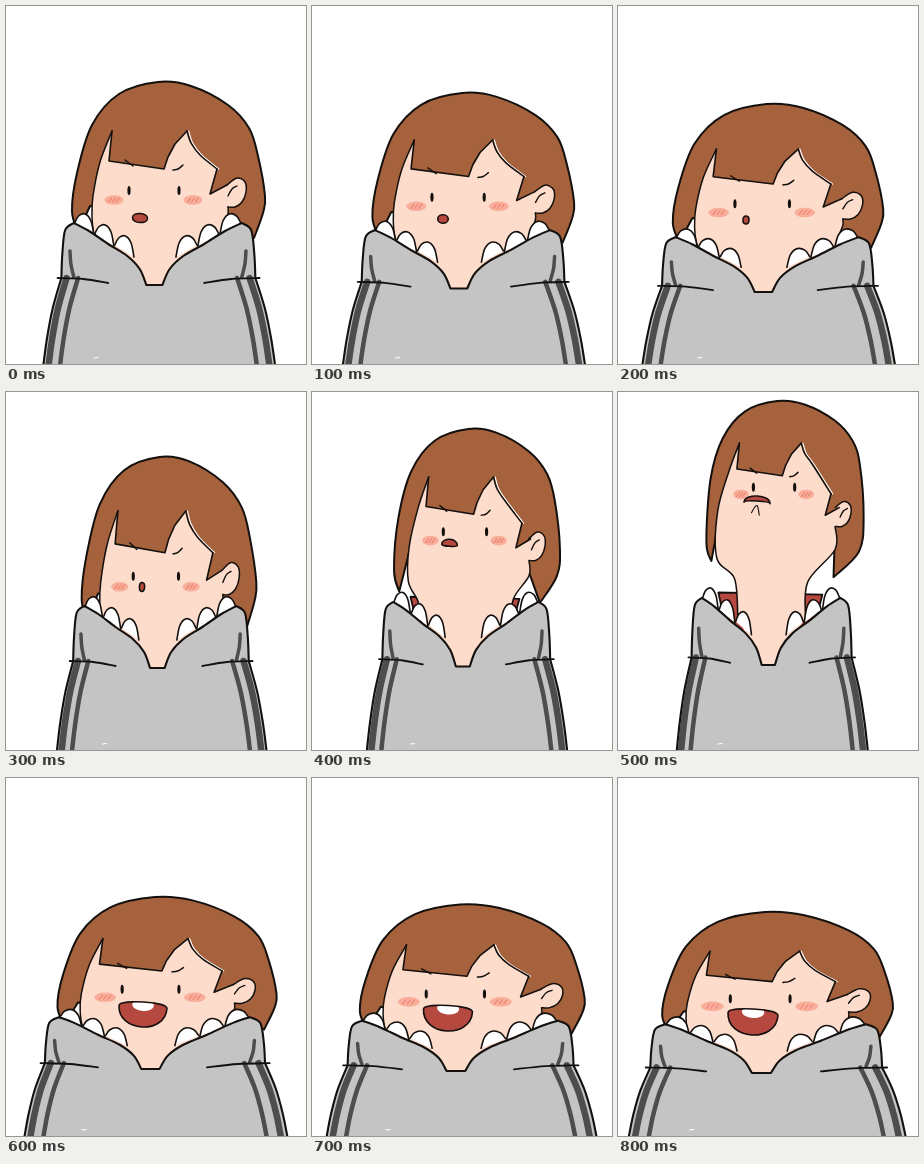
Animation of 300x358 px, one loop 900 ms. Source, as an HTML page with a canvas:

```html
<!DOCTYPE html>
<html lang="en">
<head>
<meta charset="utf-8">
<title>Stretching hoodie girl</title>
<style>
html, body { margin: 0; width: 100%; height: 100%; overflow: hidden; background: #fff; }
canvas { display: block; width: 300px; height: 358px; }
</style>
</head>
<body>
<canvas id="stage"></canvas>
<script>
const W = 300, H = 358, STEP = 100, STEPS = 9;
const INK = '#14100e', HAIR = '#a5623c', SKIN = '#fddccb', CLOTH = '#c4c4c4';
const STRIPE = '#4d4d4d', RED = '#b5483f', BLUSH = '#f8ae9a', HATCH = '#e8705c';

const canvas = document.getElementById('stage');
const ratio = window.devicePixelRatio || 1;
canvas.width = W * ratio;
canvas.height = H * ratio;
const ctx = canvas.getContext('2d');
ctx.scale(ratio, ratio);
ctx.lineCap = ctx.lineJoin = 'round';

// wide: width of everything; high: height of the head; reach: length of neck and hanging hair;
// upper and lower: bulge of the two lips.
const keys = [
  { at: 0, wide: 1,     headX: 162.5, top: 76,  high: 1,    bodyX: 148, hoodTop: 218, hoodV: 279, reach: 0, mouthX: 134, mouthY: 212, mouthW: 7.5, upper: -4.5, lower: 4.5 },
  { at: 2, wide: 1.09,  headX: 160,   top: 98,  high: .92,  bodyX: 145, hoodTop: 232, hoodV: 286, reach: 0, mouthX: 128, mouthY: 214, mouthW: 3,   upper: -4,   lower: 4 },
  { at: 3, wide: .905,  headX: 163,   top: 65,  high: 1.1,  bodyX: 151, hoodTop: 215, hoodV: 276, reach: 0, mouthX: 136, mouthY: 195, mouthW: 2.6, upper: -4.5, lower: 4.5 },
  { at: 5, wide: .825,  headX: 168,   top: 9,   high: .86,  bodyX: 150, hoodTop: 207, hoodV: 273, reach: 1, mouthX: 139, mouthY: 111, mouthW: 13,  upper: -7,   lower: -2 },
  { at: 6, wide: 1.135, headX: 161,   top: 119, high: .85,  bodyX: 144, hoodTop: 240, hoodV: 291, reach: 0, mouthX: 137, mouthY: 229, mouthW: 24,  upper: -5,   lower: 20 },
  { at: 8, wide: 1.195, headX: 159.5, top: 134, high: .8,   bodyX: 143, hoodTop: 247, hoodV: 295, reach: 0, mouthX: 135, mouthY: 236, mouthW: 25,  upper: -5,   lower: 21 }
];

function poseAt(step) {
  const i = keys.findLastIndex(k => k.at <= step);
  const a = keys[i], b = keys[i + 1] || a;
  const t = a === b ? 0 : (step - a.at) / (b.at - a.at);
  return Object.fromEntries(Object.keys(a).map(k => [k, a[k] + (b[k] - a[k]) * t]));
}

// Head points are scaled from the crown; shift is added as the neck reaches up.
function headMapper(p) {
  return (list, shift = [0, 0]) => list.map((v, i) =>
    (i % 2 ? p.top + (v - 76) * p.high : p.headX + (v - 162.5) * p.wide)
    + p.reach * shift[i % shift.length]);
}

// Body points are distances from the middle, mirrored by side, a little longer on the right.
function bodyMapper(p) {
  const mapY = y => y < 279
    ? p.hoodTop + (y - 218) / 61 * (p.hoodV - p.hoodTop)
    : p.hoodV + (y - 279) / 79 * (H - p.hoodV);
  return (side, list, inset = 0) => list.map((v, i) =>
    i % 2 ? mapY(v) : p.bodyX + (v - inset) * p.wide * (side + .045));
}

function lines(path, list) {
  for (let i = 0; i < list.length; i += 2) path.lineTo(list[i], list[i + 1]);
  return path;
}

// Smooth curve through all points of a list.
function curve(path, list) {
  const last = list.length / 2 - 1;
  const at = (i, axis) => list[2 * Math.max(0, Math.min(last, i)) + axis];
  path.lineTo(list[0], list[1]);
  for (let i = 0; i < last; i++) {
    const out = [0, 1].map(k => at(i, k) + (at(i + 1, k) - at(i - 1, k)) / 6);
    const into = [0, 1].map(k => at(i + 1, k) - (at(i + 2, k) - at(i, k)) / 6);
    path.bezierCurveTo(...out, ...into, at(i + 1, 0), at(i + 1, 1));
  }
  return path;
}

function reversed(list) {
  const out = [];
  for (let i = list.length - 2; i >= 0; i -= 2) out.push(list[i], list[i + 1]);
  return out;
}

function fill(path, color) {
  ctx.fillStyle = color;
  ctx.fill(path);
}

function ink(path, width = 1.6, color = INK) {
  ctx.lineWidth = width;
  ctx.strokeStyle = color;
  ctx.stroke(path);
}

const stroke = (list, width, color) => ink(curve(new Path2D(), list), width, color);

function oval(x, y, rx, ry, color) {
  const path = new Path2D();
  path.ellipse(x, y, rx, ry, 0, 0, 7);
  fill(path, color);
}

function drawHead(p) {
  const head = headMapper(p), earShift = [5, 18];

  const hair = curve(new Path2D(), [
    ...head([72,226, 66,205], [0,31, 0,30]),
    ...head([71,167, 86,119, 113,88, 152,76, 185,80, 222,99, 243,122, 252,150]),
    ...head([259,190, 257,207, 248,232], [-2,18, -5,38, -23,42])
  ]);
  lines(hair, head([222,222, 84,200]));
  hair.closePath();
  fill(hair, HAIR);
  ink(hair, 2);

  const fringe = head([106,125, 103,155, 158,163, 162,151, 169,138, 181,125]);
  const parting = [...fringe.slice(-2), ...head([185,137, 194,149]), ...head([211,163], earShift)];
  const strand = head([211,163, 204,188, 221,179], earShift);
  const ear = head([221,179, 231,172, 239,176, 240,186, 236,196, 229,201, 222,201], [1, 18]);
  const cheekR = head([222,201, 222,208, 218,220, 214,235], [0,18, 0,35, -24,57, -23,80]);
  const cheekL = head([92,234, 88,228, 86,210, 87,190, 94,156, 106,125], [10,80, 10,47, -6,42, -6,12, 0,0, 0,0]);

  const face = lines(new Path2D(), fringe);
  curve(face, parting);
  lines(face, strand);
  curve(face, ear);
  curve(face, cheekR);
  lines(face, [p.bodyX + 8, p.hoodV, p.bodyX - 8, p.hoodV]);
  curve(face, cheekL);
  fill(face, SKIN);

  stroke(parting.map((v, i) => i % 2 ? v : v + 1.7), 1.2, '#fff');
  ink(lines(new Path2D(), fringe));
  ink(lines(new Path2D(), strand));
  for (const list of [parting, ear, cheekL, cheekR]) stroke(list, 1.5);
  stroke(head([222,190, 226,183, 231,180], earShift), 1.4);
  stroke(head([119,154, 127,160]), 1.4);
  stroke(head([167,164, 172,163, 177,159]), 1.5);
}

function drawMouth(p) {
  const w = p.mouthW, up = p.upper * 4 / 3, low = p.lower * 4 / 3;
  const lips = new Path2D();
  lips.moveTo(-w, 0);
  lips.bezierCurveTo(-w, up, w, up, w, 0);
  lips.bezierCurveTo(w, low, -w, low, -w, 0);
  lips.closePath();
  ctx.save();
  ctx.translate(p.mouthX, p.mouthY);
  ctx.rotate(.06);
  fill(lips, RED);
  ctx.save();
  ctx.clip(lips);
  if (p.lower > 10) oval(0, -2, w * .45, 6, '#fff');
  ctx.restore();
  ink(lips, 1.6);
  if (p.reach === 1) stroke([-5, 10, -1, 3, 1, 4, 3, 12], 1.1);
  ctx.restore();
}

function drawFeatures(p) {
  const head = headMapper(p);
  for (const x of [123, 173]) {
    const [ex, ey] = head([x, 184.5], [0, -7]);
    oval(ex, ey, 1.6, 4.5, INK);
  }
  for (const x of [108, 187]) {
    const [cx, cy] = head([x, 194], [0, -8]);
    const w = 9.5 * p.wide;
    oval(cx, cy, w, 4.8, BLUSH);
    for (const d of [-.4, 0, .4]) stroke([cx + d * w + 1.5, cy - 2, cx + d * w - 1.5, cy + 2], 1, HATCH);
  }
  drawMouth(p);
}

function drawTeeth(body, side) {
  for (let i = 2; i >= 0; i--) {
    const x = 30 + 21 * i, y = 230 - 11 * i;
    const tooth = curve(new Path2D(), body(side, [x + 11, y + 9, x + 7, y + 2, x, y, x - 6, y + 7, x - 9, y + 21]));
    fill(tooth, '#fff');
    ink(tooth);
  }
}

function drawBody(p) {
  const body = bodyMapper(p), sides = [-1, 1];
  const rim = [8,279, 15,263, 28,250, 48,238, 68,225, 84,217];
  const hood = [84,217, 93,224, 96,248, 97,272];
  const flank = [97,272, 106,302, 112,332, 116,360];

  sides.forEach(side => drawTeeth(body, side));
  const shape = new Path2D();
  for (const part of [flank, hood, rim].map(reversed)) curve(shape, body(-1, part));
  for (const part of [rim, hood, flank]) curve(shape, body(1, part));
  fill(shape, CLOTH);

  ctx.save();
  ctx.clip(shape);
  for (const side of sides) {
    stroke(body(side, flank, 5.5), 6.5, STRIPE);
    stroke(body(side, flank, 17.5), 4.5, STRIPE);
    stroke(body(side, [88,245, 87,258, 84,271]), 3.5, STRIPE);
  }
  ctx.restore();
  ink(shape, 2.1);
  for (const side of sides) stroke(body(side, [48,277, 74,273, 101,272]), 1.8);
  const glint = p.bodyX - 58 * p.wide;
  stroke([glint - 2, 352, glint + 2, 351.5], 1.2, '#fff');
}

function drawLining(p) {
  const body = bodyMapper(p);
  const lining = lines(new Path2D(), [...body(-1, [48,262, 63,212]), ...body(1, [63,214, 48,262])]);
  lining.closePath();
  fill(lining, RED);
  ink(lining, 1.8);
}

function draw(p) {
  ctx.fillStyle = '#fff';
  ctx.fillRect(0, 0, W, H);
  drawLining(p);
  drawHead(p);
  drawFeatures(p);
  drawBody(p);
}

const start = performance.now();
function tick() {
  draw(poseAt(Math.floor((performance.now() - start) / STEP) % STEPS));
  requestAnimationFrame(tick);
}
tick();
</script>
</body>
</html>
```
